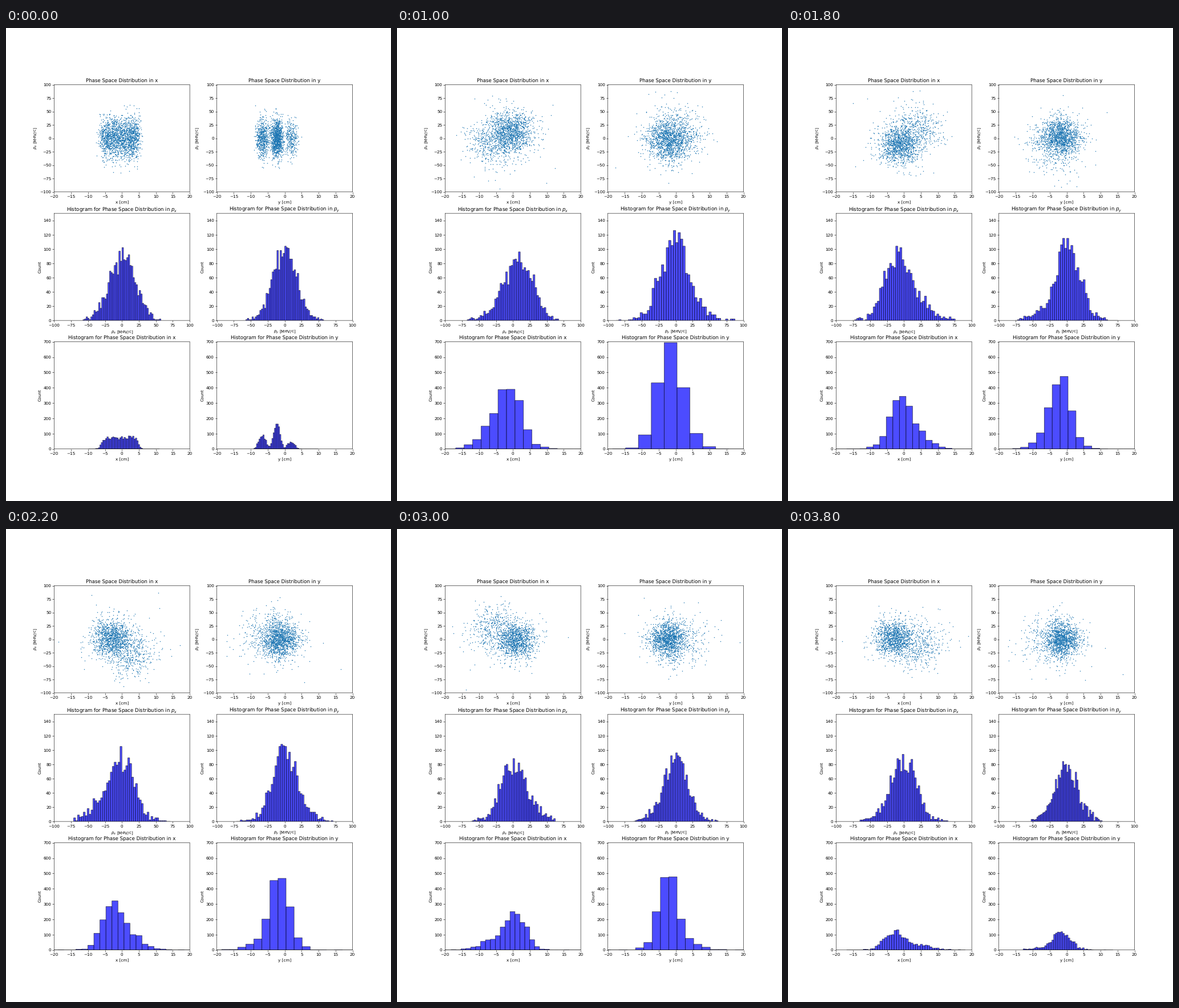
These frames come from a looping animation (675 by 830 pixels, 4000 ms). A matplotlib script:

```python
import numpy as np
import matplotlib.pyplot as plt
from matplotlib.animation import FuncAnimation

W, H, DPI = 675, 830, 51.9
FRAMES, INTERVAL = 20, 200
BINS, TOTAL = 50, 1900
P_SCALE = 6                        # MeV/c per cm, makes the orbits circles
BIN_STEPS = [0, 3, 5, 7, 15, 19]   # key points of the bin widths

plt.rcParams.update({"text.hinting": "none", "path.snap": False})


def turn(degrees):
    return np.exp(1j * np.radians(degrees))


def complex_normal(rng):
    return rng.normal(size=TOTAL) + 1j * rng.normal(size=TOTAL)


def alive(step):
    return int(1540 + 360 * np.exp(-step / 9))


class Plane:
    """One transverse plane: a core and a tail circling a pivot.

    Positions are complex, x + i p / P_SCALE.
    """

    def __init__(self, seed, start, start_sd, pivot, core, tail, share,
                 anchor, widths, p_widths):
        rng = np.random.default_rng(seed)
        self.start = start(rng) - pivot + 1j * rng.normal(0, start_sd, TOTAL) / P_SCALE
        self.in_tail = rng.random(TOTAL) < share
        halo = np.where(rng.random(TOTAL) < .015, 2.4, 1)
        self.noise = complex_normal(rng) * halo
        self.pivot, self.core, self.tail = pivot, core, tail
        self.anchor, self.widths, self.p_widths = anchor, widths, p_widths

    def swarm(self, step):
        radius, phase, sd, growth = self.core
        core_mid = radius * turn(phase - 45 * step)
        core_sd = sd + growth * np.exp(-step / 4)
        radius, phase, tail_sd = self.tail
        tail_mid = radius * np.clip((step - 2) / 3, 0, 1) * turn(phase - 40.5 * step)
        return (np.where(self.in_tail, tail_mid, core_mid)
                + np.where(self.in_tail, tail_sd, core_sd) * self.noise * turn(-45 * step))

    def state(self, step):
        mix = min(step / 3, 1) * np.pi / 2
        z = np.cos(mix) * self.start + np.sin(mix) * self.swarm(step)
        z = z[:alive(step)]
        return self.pivot + z.real, P_SCALE * z.imag

    def grids(self, step):
        side = np.arange(BINS + 1) - BINS // 2
        return (self.anchor + side * np.interp(step, BIN_STEPS, self.widths),
                side * np.interp(step, BIN_STEPS, self.p_widths))


def flat_start(rng):
    return rng.uniform(-6, 4.9, TOTAL) + rng.normal(0, .65, TOTAL)


def banded_start(rng):
    band = rng.choice(3, TOTAL, p=[.31, .52, .17])
    return -6.6 + 4.3 * band + rng.normal(0, .9, TOTAL)


planes = [
    Plane(4, flat_start, 19.5, pivot=-1, core=(2.1, 305, 2.8, 1.7),
          tail=(5.5, 33, 3.7), share=.27, anchor=.6,
          widths=[.42, 2.5, 2.5, 2.1, 1.45, .7],
          p_widths=[2.3, 3.6, 2.7, 3.2, 2.5, 2.6]),
    Plane(9, banded_start, 17, pivot=-1.9, core=(.6, 135, 2.6, 2.4),
          tail=(2.5, 247, 4.6), share=.18, anchor=.4,
          widths=[.38, 2.9, 3.8, 2.3, 2.45, .53],
          p_widths=[2.3, 3.4, 3.5, 3.2, 2.5, 2.1]),
]

fig, axes = plt.subplots(3, 2, dpi=DPI,
                         figsize=((W + .01) / DPI, (H + .01) / DPI))


def setup(ax, title, xlabel, ylabel, xlim, xstep, ylim, ystep):
    ax.set(title=title, xlabel=xlabel, ylabel=ylabel, xlim=xlim, ylim=ylim,
           xticks=range(xlim[0], xlim[1] + 1, xstep),
           yticks=range(ylim[0], ylim[1] + 1, ystep))


def make_bars(ax):
    return ax.bar(np.zeros(BINS), np.zeros(BINS), align="edge", color="blue",
                  edgecolor="black", alpha=.7)


def set_bars(bars, values, grid):
    counts, _ = np.histogram(values, grid)
    for bar, left, count in zip(bars, grid, counts):
        bar.set_bounds(left, 0, grid[1] - grid[0], count)


dots, p_bars, pos_bars = [], [], []
for name, (top, mid, low) in zip("xy", axes.T):
    mom = f"$p_{name}$"
    space = "Phase Space Distribution in "
    dots.append(top.scatter([], [], s=1))
    p_bars.append(make_bars(mid))
    pos_bars.append(make_bars(low))
    setup(top, space + name, f"{name} [cm]", f"{mom} [MeV/c]",
          (-20, 20), 5, (-100, 100), 25)
    setup(mid, "Histogram for " + space + mom, f"{mom} [MeV/c]", "Count",
          (-100, 100), 25, (0, 150), 20)
    setup(low, "Histogram for " + space + name, f"{name} [cm]", "Count",
          (-20, 20), 5, (0, 700), 100)


def update(step):
    for plane, dot, p_bar, pos_bar in zip(planes, dots, p_bars, pos_bars):
        pos, p = plane.state(step)
        grid, p_grid = plane.grids(step)
        dot.set_offsets(np.column_stack([pos, p]))
        set_bars(p_bar, p, p_grid)
        set_bars(pos_bar, pos, grid)
    return dots


anim = FuncAnimation(fig, update, frames=FRAMES, interval=INTERVAL, repeat=True)
plt.show()
```
